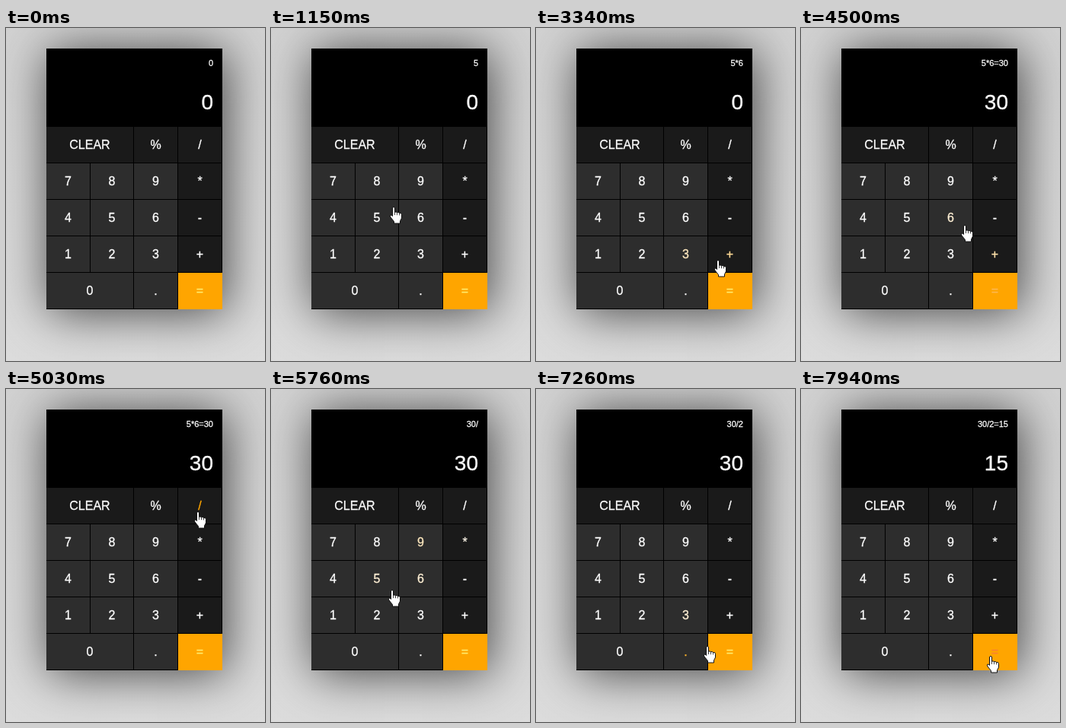
Write an HTML page that moves like this. It is 340 px wide and 438 px high and loops after 7990 ms.

```html
<!DOCTYPE html>
<html lang="en">
<head>
<meta charset="utf-8">
<title>Calculator</title>
<style>
  html, body { margin: 0; width: 100%; height: 100%; overflow: hidden; }
  body {
    position: relative;
    background: linear-gradient(#d2d2d2, #dcdcdc);
    font: 16px/47px "Liberation Sans", Arial, sans-serif;
    color: #fff;
    -webkit-text-stroke: .3px;
  }
  #calc {
    position: absolute; left: 53px; top: 27px; width: 231px; height: 343px;
    background: #000;
    box-shadow: 4px 4px 60px rgba(0, 0, 0, .7);
  }
  #sum, #result { position: absolute; right: 12px; white-space: pre; }
  #sum { top: 9px; font-size: 11px; line-height: 20px; }
  #result { top: 51px; font-size: 28px; line-height: 40px; }
  #keys {
    position: absolute; top: 103px;
    display: grid; grid-template: repeat(5, 48px) / 58px 57px 58px 58px;
  }
  #keys div {
    box-sizing: border-box; text-align: center; background: #2d2d2d;
    border: solid #000; border-width: 0 1px 1px 0;
  }
  #keys .op { background: #1a1a1a; }
  #keys .wide { grid-column: span 2; }
  #keys .equals { background: #ffa500; border-color: #ffa500; }
  #hand { position: absolute; left: 0; top: 0; overflow: visible; pointer-events: none; }
</style>
</head>
<body>
<div id="calc">
  <div id="sum"></div>
  <div id="result"></div>
  <div id="keys"></div>
</div>
<svg id="hand" width="18" height="23" stroke="#111" stroke-linejoin="round">
  <path fill="#fff" d="M3.5 2a1.5 1.5 0 0 1 3 0V7.2q1.6-.8 3 .4 1.7-.5 3 .8 3-.4 3 2V15l-2 4v3h-8v-2.5L1 14Q-.2 11.7 1 11q1.3-.3 2.500 1.500z"/>
  <path fill="none" stroke-width=".8" d="M6.500 7v4M9.500 7.800v3.400M12.500 8.600v2.800"/>
</svg>
<script>
const LOOP = 7990, FADE = 120, SAMPLES = 12, ENTER = 170;
const WHITE = [255, 255, 255], ORANGE = [255, 165, 0];
const PALE = [255, 236, 110], SALMON = [250, 130, 50];

const entry = { x: 230, y: 373 };
const moves = [
  { at: ENTER, time: 310, x: 130, y: 246 },
  { at: 1000, time: 500, x: 251, y: 197 },
  { at: 2090, time: 330, x: 189, y: 238 },
  { at: 3140, time: 300, x: 249, y: 328 },
  { at: 4430, time: 80, x: 209, y: 256 },
  { at: 4550, time: 350, x: 247, y: 161 },
  { at: 5660, time: 110, x: 152, y: 266 },
  { at: 5770, time: 180, x: 108, y: 266 },
  { at: 6420, time: 230, x: 126, y: 286 },
  { at: 6920, time: 480, x: 244, y: 351 }
];
const clicks = [
  { at: 1000, key: '5' }, { at: 1790, key: '*' }, { at: 2650, key: '6' },
  { at: 3680, key: '=' }, { at: 5180, key: '/' }, { at: 6920, key: '2' },
  { at: 7890, key: '=' }
];

const byId = id => document.getElementById(id);
const clamp = k => Math.max(0, Math.min(1, k));
const smooth = k => k * k * (3 - 2 * k);
const mix = (a, b, k) => Math.round(a + (b - a) * k);
const before = t => clicks.filter(c => c.at <= t);
const sum = byId('sum'), result = byId('result'), hand = byId('hand');

const keys = 'CLEAR % / 7 8 9 * 4 5 6 - 1 2 3 + 0 . ='.split(' ').map(label => {
  const key = document.createElement('div');
  key.textContent = label;
  if (label === '=') key.className = 'equals';
  else if (!/[\d.]/.test(label)) key.className = 'op';
  if (label === 'CLEAR' || label === '0') key.classList.add('wide');
  byId('keys').append(key);
  return key;
});

function press(state, key) {
  if (key === '=') {
    const [a, op, b] = state.sum.split(/([*/])/);
    const value = op === '*' ? a * b : a / b;
    return { sum: `${state.sum}=${value}`, result: value };
  }
  const kept = state.sum.includes('=') ? state.result : state.sum;
  return { sum: kept === '0' ? key : kept + key, result: state.result };
}

function handAt(t) {
  let { x, y } = entry;
  for (const move of moves) {
    const k = smooth(clamp((t - move.at) / move.time));
    x = mix(x, move.x, k);
    y = mix(y, move.y, k);
  }
  return { x, y };
}

// A pressed key cools down under the hand; only "=" stays lit.
function hotKey(t) {
  const { x, y } = handAt(t);
  const key = document.elementFromPoint(x + 5, y + 1);
  const last = before(t).pop();
  const pressed = key && last && last.key !== '=' && last.key === key.textContent;
  return pressed ? null : key;
}

function draw(t) {
  const recent = Array.from({ length: SAMPLES }, (_, i) => hotKey(t - i * FADE / SAMPLES));
  for (const key of keys) {
    const [cold, hot] = key.textContent === '=' ? [PALE, SALMON] : [WHITE, ORANGE];
    const level = recent.filter(k => k === key).length / SAMPLES;
    key.style.color = `rgb(${cold.map((c, i) => mix(c, hot[i], level))})`;
  }

  const state = before(t).reduce((s, c) => press(s, c.key), { sum: '0', result: '0' });
  sum.textContent = state.sum;
  result.textContent = state.result;

  const { x, y } = handAt(t);
  hand.style.visibility = t < ENTER ? 'hidden' : 'visible';
  hand.style.transform = `translate(${x}px, ${y}px)`;
}

const start = performance.now();
function tick() {
  draw((performance.now() - start) % LOOP);
  requestAnimationFrame(tick);
}
tick();
</script>
</body>
</html>
```
